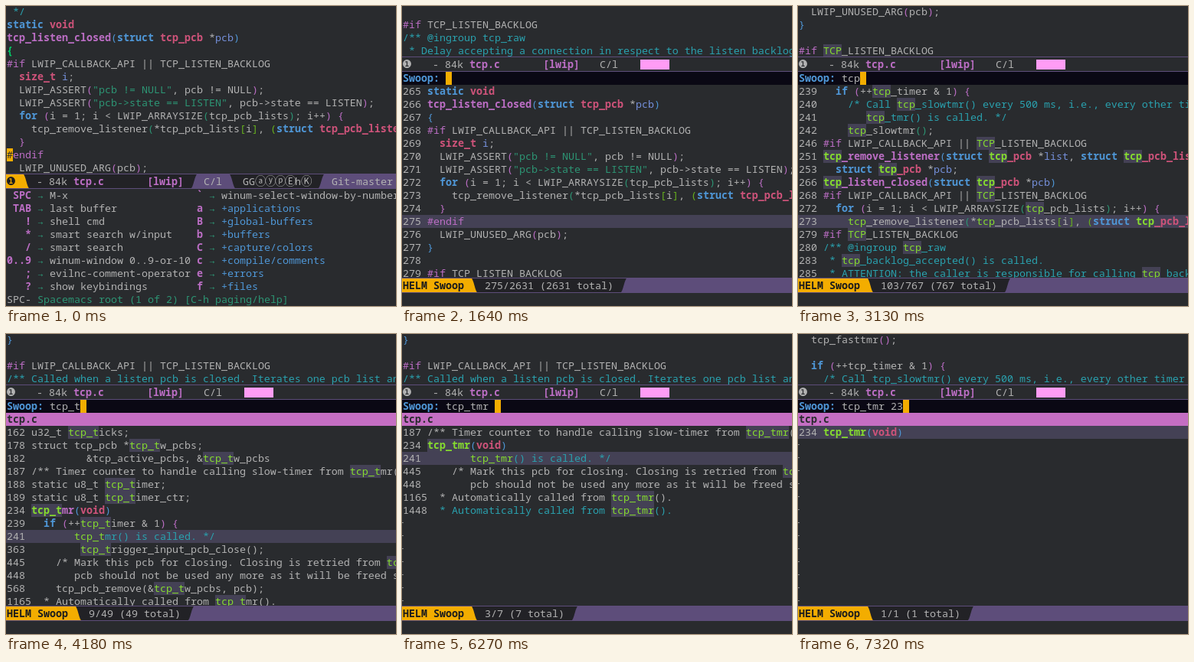
These frames come from a looping animation (509x392 px, 8 s). An HTML page:

```html
<!DOCTYPE html>
<html lang="en">
<head>
<meta charset="utf-8">
<title>Helm Swoop</title>
<style>
html, body { margin: 0; width: 100%; height: 100%; overflow: hidden; background: #292b2e; }
#stage {
  position: relative; width: 509px; height: 392px; overflow: hidden;
  background: #292b2e; color: #b2b2b2;
  font: 13.3333px/16px "Noto Sans Mono", "DejaVu Sans Mono", monospace;
  font-variant-ligatures: none;
}
.scene { position: absolute; inset: 0; visibility: hidden; }
.scene.on { visibility: visible; }
.row { position: absolute; left: 0; width: 509px; height: 17px; overflow: hidden; }
.txt { position: absolute; top: 0; white-space: pre; }
.sel { background: #444155; }
.src { background: #c56ec3; color: #292b2e; font-weight: bold; }
.prompt { background: #0a0814; }
.tilde { position: absolute; left: 0; top: 7px; width: 2px; height: 1px; background: #8a8a8a; }
.bar { position: absolute; left: 0; width: 509px; height: 20px; overflow: hidden; background: #292b2e; }
.bar svg { position: absolute; left: 0; top: 0; }
.bar .txt { top: 2px; }
.ring { font-family: "DejaVu Sans", "Noto Sans CJK JP", sans-serif; font-size: 14.5px; }
.kw { color: #4f97d7; font-weight: bold; }
.fn { color: #bc6ec5; font-weight: bold; }
.ty { color: #ce537a; font-weight: bold; }
.va { color: #7590db; }
.st, .d2 { color: #2d9574; }
.co { color: #2aa1ae; }
.pp, .d1 { color: #bc6ec5; }
.d0, .grp { color: #4f97d7; }
.d3 { color: #67b11d; }
.pair { color: #00cd66; font-weight: bold; }
.cur, .hit { display: inline-block; height: 17px; vertical-align: top; }
.cur { background: #f3ad00; color: #292b2e; }
.hit { background: #444155; color: #86dc2f; }
.dark { color: #1c1c1c; }
.b { font-weight: bold; }
</style>
</head>
<body>
<div id="stage"></div>
<script>
const CODE = {
  162: 'u32_t tcp_ticks;',
  178: 'struct tcp_pcb *tcp_tw_pcbs;',
  182: '         &tcp_active_pcbs, &tcp_tw_pcbs',
  187: '/** Timer counter to handle calling slow-timer from tcp_tmr() */',
  188: 'static u8_t tcp_timer;',
  189: 'static u8_t tcp_timer_ctr;',
  234: 'tcp_tmr(void)',
  237: '  tcp_fasttmr();',
  239: '  if (++tcp_timer & 1) {',
  240: '    /* Call tcp_slowtmr() every 500 ms, i.e., every other timer',
  241: '       tcp_tmr() is called. */',
  242: '    tcp_slowtmr();',
  244: '}',
  246: '#if LWIP_CALLBACK_API || TCP_LISTEN_BACKLOG',
  247: '/** Called when a listen pcb is closed. Iterates one pcb list and removes the',
  248: ' * closed listener pcb from pcb->listener if matching.',
  251: 'tcp_remove_listener(struct tcp_pcb *list, struct tcp_pcb_listen *lpcb)',
  253: '  struct tcp_pcb *pcb;',
  256: '      pcb->listener = NULL;',
  262: '/** Called when a listen pcb is closed. Iterates all pcb lists and removes the',
  263: ' * closed listener pcb from pcb->listener if matching.',
  264: ' */',
  265: 'static void',
  266: 'tcp_listen_closed(struct tcp_pcb *pcb)',
  267: '{',
  268: '#if LWIP_CALLBACK_API || TCP_LISTEN_BACKLOG',
  269: '  size_t i;',
  270: '  LWIP_ASSERT("pcb != NULL", pcb != NULL);',
  271: '  LWIP_ASSERT("pcb->state == LISTEN", pcb->state == LISTEN);',
  272: '  for (i = 1; i < LWIP_ARRAYSIZE(tcp_pcb_lists); i++) {',
  273: '    tcp_remove_listener(*tcp_pcb_lists[i], (struct tcp_pcb_listen *)pcb);',
  274: '  }',
  275: '#endif',
  276: '  LWIP_UNUSED_ARG(pcb);',
  277: '}',
  279: '#if TCP_LISTEN_BACKLOG',
  280: '/** @ingroup tcp_raw',
  281: ' * Delay accepting a connection in respect to the listen backlog:',
  282: ' * the number of outstanding connections is increased until',
  283: ' * tcp_backlog_accepted() is called.',
  285: ' * ATTENTION: the caller is responsible for calling tcp_backlog_accepted()',
  363: '        tcp_trigger_input_pcb_close();',
  445: '    /* Mark this pcb for closing. Closing is retried from tcp_tmr(). */',
  448: '       pcb should not be used any more as it will be freed soon */',
  568: '    tcp_pcb_remove(&tcp_tw_pcbs, pcb);',
  1165: ' * Automatically called from tcp_tmr().',
  1448: ' * Automatically called from tcp_tmr().'
};
const PLAIN = new Set([162, 178, 182, 187, 188, 189, 363, 445, 448, 568, 1165]);
const COMMENT = /^\s*(\/\*|\* |\*\/)|\*\/$/;
const RULES = [
  [/"[^"]*"/g, 'st'],
  [/^#\w+/g, 'pp'],
  [/^tcp_\w+(?=\()/g, 'fn'],
  [/\b(static|struct|if|for)\b/g, 'kw'],
  [/\b(void|size_t)\b|(?<=struct )\w+/g, 'ty'],
  [/(?<=\*)(l?pcb|list)(?=[;,)])|(?<=size_t )i/g, 'va']
];

const esc = s => s.replace(/&/g, '&amp;').replace(/</g, '&lt;');
const range = (a, n) => Array.from({ length: n }, (_, i) => a + i);
const span = (cls, s) => cls ? `<span class="${cls}">${esc(s)}</span>` : esc(s);
const txt = (x, html, cls = '') => `<span class="txt ${cls}" style="left:${x}px">${html}</span>`;
const row = (y, html, cls = '') => `<div class="row ${cls}" style="top:${y}px">${html}</div>`;

function colorBrackets(text, cls) {
  let depth = Math.floor(text.search(/\S/) / 2) + (/^\s*}/.test(text) ? 1 : 0);
  [...text].forEach((ch, i) => {
    if (cls[i]) return;
    if ('([{'.includes(ch)) cls[i] = 'd' + depth++;
    else if (')]}'.includes(ch)) cls[i] = 'd' + --depth;
  });
}

// Syntax-colours one line; `query` adds search hits, `first` restyles its first character.
function paint(n, query, first) {
  const text = CODE[n] || '';
  const isComment = !PLAIN.has(n) && COMMENT.test(text);
  const cls = Array(text.length).fill(isComment ? 'co' : '');
  if (!isComment && !PLAIN.has(n)) {
    for (const [re, c] of RULES)
      for (const m of text.matchAll(re))
        for (let i = m.index; i < m.index + m[0].length; i++) cls[i] = cls[i] || c;
    colorBrackets(text, cls);
  }
  if (query)
    for (const m of text.matchAll(new RegExp(query, 'gi')))
      for (let i = m.index; i < m.index + m[0].length; i++) cls[i] += ' hit';
  if (first) cls[0] = first;
  let html = '';
  for (let i = 0, j; i < text.length; i = j) {
    for (j = i + 1; j < text.length && cls[j] === cls[i];) j++;
    html += span(cls[i], text.slice(i, j));
  }
  return html;
}

const DARK = '#222226', PURPLE = '#5d4d7a', YELLOW = '#f3ad00';

// Fills everything right of a wavy separator; lean 1 is "\", -1 is "/".
function wave(x, lean, color) {
  const [a, b] = lean > 0 ? [x, x + 11] : [x + 11, x], m = x + 5.5;
  return `<path fill="${color}" d="M${a} 0C${m} 0 ${m} 20 ${b} 20H509V0z"/>`;
}
function bar(y, shapes, texts) {
  return `<div class="bar" style="top:${y}px"><svg width="509" height="20">${shapes}` +
    `<path stroke="${PURPLE}" d="M0 .5H509M0 19.5H509"/></svg>${texts}</div>`;
}
const fill = c => `<path fill="${c}" d="M0 0H509V20H0z"/>`;
const fileInfo = num => txt(0, '❶', 'ring ' + num) + txt(40, '- 84k') +
  txt(88, 'tcp.c', 'fn') + txt(184, '[lwip]', 'fn') + txt(258, 'C/l');

function activeBar(y) {
  const shapes = fill(YELLOW) + wave(21, 1, DARK) + wave(240, -1, PURPLE) +
    wave(290, 1, DARK) + wave(406, -1, PURPLE);
  const rings = [...'ⓐⓨⓟⒺ'].map((c, i) => txt(325 + 13 * i, c, 'ring')).join('');
  return bar(y, shapes, fileInfo('dark') + txt(309, 'GG') + rings +
    txt(377, 'h') + txt(385, 'Ⓚ', 'ring') + txt(425, 'Git-master'));
}
const idleBar = () =>
  bar(66, '<rect x="311" y="4" width="38" height="13" fill="#ff9cf5"/>', fileInfo(''));

function helmBar(count) {
  const end = 108 + count.length * 8 + 8;
  return bar(355, fill(YELLOW) + wave(89, 1, DARK) + wave(end, -1, PURPLE),
    txt(1, 'HELM Swoop', 'b dark') + txt(108, count));
}

// Key menu columns: [key column, key width, entries].
function menu(y, columns) {
  return columns.map(([col, width, items]) => items.map((item, i) => {
    const [key, ...rest] = item.split(' '), label = rest.join(' ');
    return row(y + 17 * i, txt(1 + 8 * col, key.padStart(width), 'fn') +
      txt(1 + 8 * (col + width + 1), '→', 'st') +
      txt(1 + 8 * (col + width + 3), label, label[0] === '+' ? 'grp' : ''));
  }).join('')).join('');
}

const ROOT = [
  [0, 4, ['SPC M-x', 'TAB last buffer', '! shell cmd', '* smart search w/input', '/ smart search',
    '0..9 winum-window 0..9-or-10', '; evilnc-comment-operator', '? show keybindings']],
  [31, 1, ['` winum-select-window-by-number', 'a +applications', 'B +global-buffers', 'b +buffers',
    'C +capture/colors', 'c +compile/comments', 'e +errors', 'f +files']]
];
const SEARCH = [
  [0, 1, ['` helm-ag-pop-stack', 'a +ag', 'B helm-buffers-smart-do-search-reg..',
    'b helm-buffers-smart-do-search', 'c evil-search-clear-highlight', 'e evil-iedit-state/iedit-mode']],
  [39, 1, ['F helm-files-smart-do-search', 'f helm-files-smart-do-search', 'g +grep',
    'H goto-last-searched-ahs-symbol', 'h symbol-highlight', 'j helm-jump-in-buffer']]
];

function editor(barY, columns, keys, hint) {
  const marks = { 267: 'pair', 275: 'cur', 277: 'pair' };
  const lines = range(264, Math.floor(barY / 17) + 1)
    .map((n, i) => row(17 * i - 1, txt(1, paint(n, '', marks[n])))).join('');
  // Overlaid rows below the window are hidden by the bar and a blank panel.
  return lines + activeBar(barY) +
    `<div style="position:absolute;top:${barY + 20}px;width:509px;height:200px;background:#292b2e"></div>` +
    menu(barY + 20, columns) + row(375, txt(1, keys + span('st', hint)));
}

function swoop(typed, query, list, selected, count, titled) {
  const preview = range(selected + 3, 4)
    .map((n, i) => row(17 * i - 1, txt(1, paint(n, query)))).join('');
  const prompt = row(86, txt(1, span('kw', 'Swoop:') + ' ' + typed + span('cur', ' ')), 'prompt');
  const rows = list.map(n => [txt(1, n + ' ' + paint(n, query)), n === selected ? 'sel' : '']);
  if (titled) rows.unshift([txt(1, 'tcp.c'), 'src']);
  while (rows.length < 15) rows.push(['<i class="tilde"></i>', '']);
  return preview + idleBar() + prompt +
    rows.map(([html, cls], i) => row(103 + 17 * i, html, cls)).join('') +
    helmBar(count) + row(375, '');
}

const ALL = range(265, 15);
const T = [256, 262, 263, 265, 266, 268, 269, 270, 271, 272, 273, 279, 280, 281, 282];
const TC = [241, 242, 246, 248, 251, 253, 263, 266, 268, 272, 273, 279, 280, 283, 285];
const TCP = [239, 240, 241, 242, 246, 251, 253, 266, 268, 272, 273, 279, 280, 283, 285];
const TCP_T = [162, 178, 182, 187, 188, 189, 234, 239, 241, 363, 445, 448, 568, 1165];
const TMR = [187, 234, 241, 445, 448, 1165, 1448];

const rootHint = ' Spacemacs root (1 of 2) [C-h paging/help]';
const search = editor(253, SEARCH, 'SPC s-', ' search/symbol [C-h paging/help]');
const total = (i, n) => `${i}/${n} (${n} total)`;

const SCENES = [
  [0, editor(219, ROOT, 'SPC-', rootHint)],
  [300, editor(219, ROOT, 'SPC s-', '')],
  [740, search],
  [1490, search + idleBar()],
  [1640, swoop('', '', ALL, 275, total(275, 2631))],
  [2390, swoop('t', '', ALL, 275, total(275, 2631))],
  [2530, swoop('t', 't', T, 273, total(149, 1463))],
  [2680, swoop('tc', 't', T, 273, total(149, 1463))],
  [2830, swoop('tc', 'tc', TC, 273, total(105, 779))],
  [2980, swoop('tcp', 'tc', TC, 273, total(105, 779))],
  [3130, swoop('tcp', 'tcp', TCP, 273, total(103, 767))],
  [3730, swoop('tcp_', 'tcp', TCP, 273, total(103, 767))],
  [3880, swoop('tcp_', 'tcp_', TCP, 273, total(95, 698))],
  [4180, swoop('tcp_t', 'tcp_t', TCP_T, 241, total(9, 49), true)],
  [4780, swoop('tcp_tm', 'tcp_tm', TMR, 241, total(3, 7), true)],
  [5530, swoop('tcp_tmr', 'tcp_tmr', TMR, 241, total(3, 7), true)],
  [6270, swoop('tcp_tmr ', 'tcp_tmr', TMR, 241, total(3, 7), true)],
  [6570, swoop('tcp_tmr 2', 'tcp_tmr', TMR, 241, total(3, 7), true)],
  [6720, swoop('tcp_tmr 2', 'tcp_tmr', [234, 241], 241, total(2, 2), true)],
  [7170, swoop('tcp_tmr 23', 'tcp_tmr', [234, 241], 241, total(2, 2), true)],
  [7320, swoop('tcp_tmr 23', 'tcp_tmr', [234], 234, total(1, 1), true)]
];
const LOOP = 8000;

const stage = document.getElementById('stage');
stage.innerHTML = SCENES.map(([, html]) => `<div class="scene">${html}</div>`).join('');
const views = [...stage.children];
const start = performance.now();

function tick() {
  const t = (performance.now() - start) % LOOP;
  const now = SCENES.findLastIndex(([at]) => at <= t);
  views.forEach((v, i) => v.classList.toggle('on', i === now));
  requestAnimationFrame(tick);
}
tick();
</script>
</body>
</html>
```
